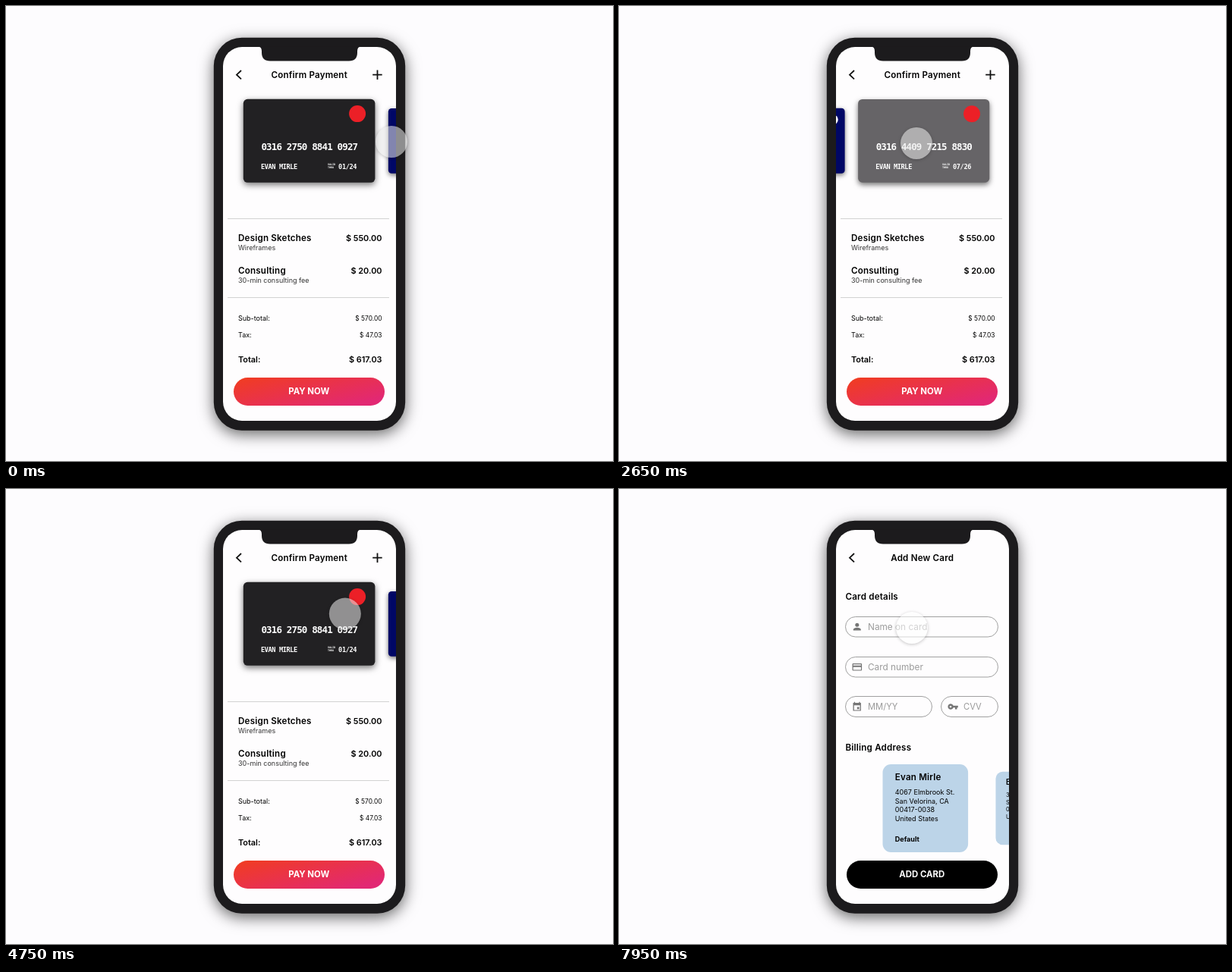
These frames come from a looping animation (800x600 px, 8 s). An HTML page:

```html
<!DOCTYPE html>
<html lang="en">
<head>
<meta charset="utf-8">
<title>Confirm payment</title>
<style>
  html, body { margin: 0; width: 100%; height: 100%; overflow: hidden; background: #fdfcfe; }
  svg { display: block; width: 800px; height: 600px; font: 400 9px Inter, sans-serif; }
  .bold { font-weight: 600; font-size: 11.6px; letter-spacing: .2px; }
  .price { font-weight: 600; font-size: 10.9px; }
  .small { font-size: 8.4px; }
  .middle { text-anchor: middle; }
  .end { text-anchor: end; }
  .button { font-weight: 700; font-size: 11.4px; fill: #fff; text-anchor: middle; }
  .hint { font-size: 11.8px; fill: #9b9b9b; }
  .field { fill: none; stroke: #a0a0a0; }
  .icon { fill: #757575; }
  .line { fill: none; stroke: #111; stroke-width: 1.8; }
  .rule { stroke: #d2d2d2; }
  .bank text { font-family: "DejaVu Sans Mono", monospace; font-weight: 700; fill: #fff; }
  .bank .number { font-size: 12.5px; letter-spacing: -.85px; }
  .bank .info { font-size: 8.6px; letter-spacing: -.38px; }
  .bank .valid { font-size: 3.4px; }
  .bank { filter: drop-shadow(0 3px 4px rgba(0,0,0,.55)); }
  .phone { filter: drop-shadow(0 5px 10px rgba(0,0,0,.6)); }
  #cursor { opacity: .56; filter: drop-shadow(0 1px 2px rgba(0,0,0,.4)); }
</style>
</head>
<body>
<svg viewBox="0 0 800 600">
  <defs>
    <clipPath id="screen"><rect x="286" y="54" width="228" height="493" rx="25"/></clipPath>
    <linearGradient id="pay" x1="0" y1="0" x2="1" y2=".7">
      <stop offset="0" stop-color="#f13d1f"/><stop offset="1" stop-color="#e22873"/>
    </linearGradient>
  </defs>

  <rect class="phone" x="273.8" y="41.8" width="252.4" height="518" rx="37" fill="#1c1b1d"/>

  <g clip-path="url(#screen)">
    <rect x="286" y="54" width="228" height="493"/>

    <g id="confirm">
      <rect x="286" y="54" width="228" height="493" fill="#fefdfe"/>
      <path class="line" d="M310 85l-6 5.7 6 5.7M483.2 90.7h12.5M489.5 84.5v12.5"/>
      <text class="bold middle" x="399.7" y="94.6">Confirm Payment</text>
      <g id="cards"></g>
      <path class="rule" d="M292 280.5h213M292 384.5h213"/>
      <text class="bold" x="306" y="310">Design Sketches</text>
      <text x="306" y="322" fill="#333">Wireframes</text>
      <text class="price end" x="495.5" y="310">$ 550.00</text>
      <text class="bold" x="306" y="353">Consulting</text>
      <text x="306" y="364.7" fill="#333">30-min consulting fee</text>
      <text class="price end" x="495.5" y="353">$ 20.00</text>
      <text x="306" y="415.3">Sub-total:</text>
      <text class="small end" x="495.5" y="415.3">$ 570.00</text>
      <text x="306" y="437.3">Tax:</text>
      <text class="small end" x="495.5" y="437.3">$ 47.03</text>
      <text class="price" x="306" y="470">Total:</text>
      <text class="price end" x="495.5" y="470">$ 617.03</text>
      <rect x="300" y="490" width="199" height="37" rx="18.5" fill="url(#pay)"/>
      <text class="button" x="399.3" y="512.2">PAY NOW</text>
    </g>

    <g id="add">
      <rect x="286" y="54" width="228" height="493" fill="#fefdfe"/>
      <path class="line" d="M310 85l-6 5.7 6 5.7"/>
      <text class="bold middle" x="399.7" y="94.6">Add New Card</text>
      <text class="bold" x="298.5" y="145.7">Card details</text>
      <g class="field">
        <rect x="298.5" y="168.5" width="201" height="26.5" rx="13.2"/>
        <rect x="298.5" y="221.5" width="201" height="26.5" rx="13.2"/>
        <rect x="298.5" y="273.5" width="114" height="27" rx="13.5"/>
        <rect x="424.5" y="273.5" width="75" height="27" rx="13.5"/>
      </g>
      <g class="icon">
        <circle cx="313.8" cy="179.3" r="2.5"/>
        <path d="M308.8 186.6v-1.2c0-3.4 10-3.4 10 0v1.2z"/>
        <path fill-rule="evenodd" d="M308.5 230h10.6q1 0 1 1v7.6q0 1-1 1h-10.6q-1 0-1-1V231q0-1 1-1zM308.7 231.3v1.4h10.2v-1.4zM308.7 234.8v3.6h10.2v-3.6z"/>
        <path fill-rule="evenodd" d="M308.5 282h1.3v-1.2h1.3v1.2h5.2v-1.2h1.3v1.2h1.3v10.6h-10.4zM309.8 285.2v6.2h7.8v-6.2zM313.8 287.4h2.8v2.8h-2.8z"/>
        <path fill-rule="evenodd" d="M440.6 285.7h6.2v2.6h-1.3v2.3h-2.6v-2.3h-2.3a3.7 3.7 0 1 1 0-2.6zM437 285.7a1.3 1.3 0 1 0 .01 0z"/>
      </g>
      <text class="hint" x="328" y="186.3">Name on card</text>
      <text class="hint" x="328" y="239.3">Card number</text>
      <text class="hint" x="328" y="291.2" style="font-size:11.2px">MM/YY</text>
      <text class="hint" x="454" y="291.2" style="font-size:11.2px">CVV</text>
      <text class="bold" x="298.5" y="344.8">Billing Address</text>
      <g id="addresses"></g>
      <rect x="300" y="490" width="199" height="37" rx="18.5"/>
      <text class="button" x="399.3" y="512.2">ADD CARD</text>
    </g>
  </g>

  <path fill="#1c1b1d" d="M332 53.5q5 0 5 6v2q0 11 11 11h104q11 0 11-11v-2q0-6 5-6z"/>
  <circle id="cursor" r="21"/>
</svg>

<script>
const LOOP = 8000, SPACING = 172, CENTER = { x: 399.6, y: 177.8 };
const byId = id => document.getElementById(id);
const smooth = u => { u = Math.min(1, Math.max(0, u)); return u * u * (3 - 2 * u); };
const ramp = (t, from, to) => smooth((t - from) / (to - from));
const mix = (a, b, u) => a + (b - a) * u;

const bankCards = [
  { fill: "#222123", mark: "#ec2027", markX: 63.5, r: 11, number: "0316 2750 8841 0927", date: "01/24" },
  { fill: "#000766", mark: "#fff", markX: 67, r: 8.5, number: "0742 6183 3095 1460", date: "04/25" },
  { fill: "#666467", mark: "#ec2027", markX: 63.5, r: 11, number: "0316 4409 7215 8830", date: "07/26" }
];

byId("cards").innerHTML = bankCards.map(c => `
  <g class="bank">
    <rect x="-86.8" y="-55" width="173.6" height="110" rx="5.5" fill="${c.fill}"/>
    <circle cx="${c.markX}" cy="-35.7" r="${c.r}" fill="${c.mark}"/>
    <text class="number" x="-63.2" y="12.6">${c.number}</text>
    <text class="info" x="-63.7" y="37">EVAN MIRLE</text>
    <text class="valid" x="24.3" y="32.3">VALID</text>
    <text class="valid" x="24.3" y="35.8">THRU</text>
    <text class="info" x="38.5" y="37">${c.date}</text>
  </g>`).join("");

const address = (x, scale, lines, note) => `
  <g transform="translate(${x} 421) scale(${scale})">
    <rect x="-56.3" y="-58" width="112.6" height="116" rx="11" fill="#bcd4e8"/>
    <text class="bold" x="-40" y="-37">Evan Mirle</text>
    ${lines.map((line, i) => `<text x="-40" y="${-18.2 + i * 11.8}">${line}</text>`).join("")}
    <text x="-40" y="43.6" style="font-weight:700">${note}</text>
  </g>`;
byId("addresses").innerHTML =
  address(403.8, 1, ["4067 Elmbrook St.", "San Velorina, CA", "00417-0038", "United States"], "Default") +
  address(543.2, .83, ["3180 Farloe Rd.", "San Velorina, CA", "00417-0052", "United States"], "");

// Carousel swipes: start, end, direction
const swipes = [[700, 1600, 1], [1800, 2710, 1], [2850, 3545, -1], [3650, 4325, -1]];

// Pointer stops: time, x, y
const stops = [
  [0, 508, 179], [650, 508, 179], [1200, 415, 180], [1350, 415, 180], [1650, 490, 180],
  [2130, 392, 181], [2700, 392, 181], [3400, 474, 191], [3470, 474, 191], [3700, 372, 191],
  [4250, 432, 191], [4400, 432, 191], [5450, 489, 89.5], [6850, 489, 89.5], [7600, 386, 183],
  [LOOP, 386, 183]
];

function pointerAt(t) {
  const i = stops.findIndex((s, k) => k && t <= s[0]);
  const [t0, x0, y0] = stops[i - 1], [t1, x1, y1] = stops[i];
  const u = ramp(t, t0, t1);
  return [mix(x0, x1, u), mix(y0, y1, u)];
}

function draw(t) {
  const position = swipes.reduce((sum, [from, to, dir]) => sum + dir * ramp(t, from, to), 0);
  [...byId("cards").children].forEach((card, i) => {
    const offset = i - position;
    const scale = 1 - .22 * Math.min(1, Math.abs(offset));
    card.setAttribute("transform",
      `translate(${CENTER.x + offset * SPACING} ${CENTER.y}) scale(${scale})`);
  });

  // Cross-dissolve over black
  const fade = ramp(t, 6125, 6675);
  byId("confirm").setAttribute("opacity", 1 - fade);
  byId("add").setAttribute("opacity", fade);

  const cursor = byId("cursor"), [x, y] = pointerAt(t);
  const tone = mix(232, 255, ramp(t, 4800, 5450));
  cursor.setAttribute("transform", `translate(${x} ${y})`);
  cursor.setAttribute("fill", `rgb(${tone},${tone},${tone})`);
}

function tick() {
  draw(performance.now() % LOOP);
  requestAnimationFrame(tick);
}
tick();
</script>
</body>
</html>
```
